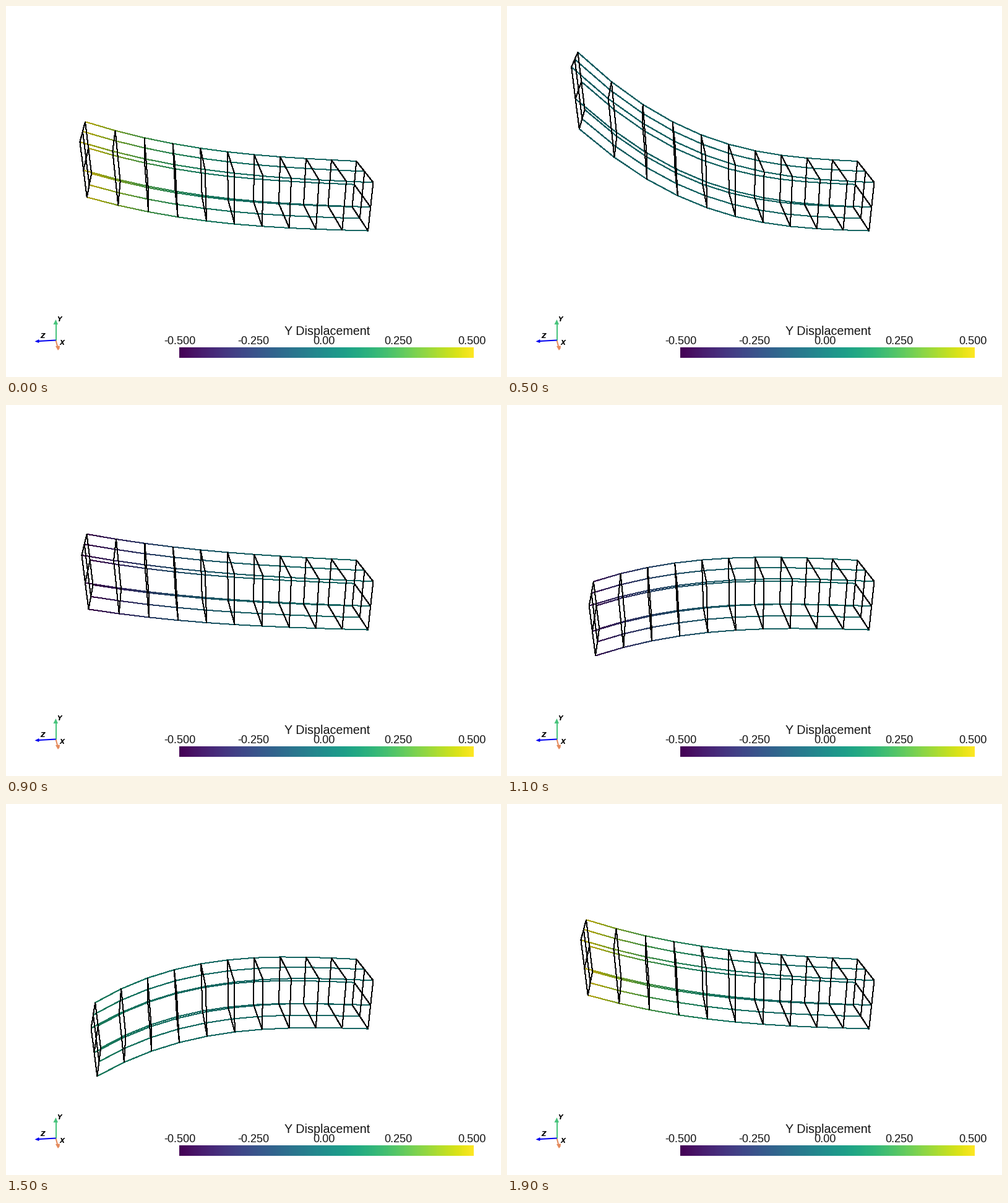
Recreate the animation shown at these times as a matplotlib script. Size 800 px wide and 600 px high, loop 2 s.

```python
import numpy as np
import matplotlib.pyplot as plt
from matplotlib.animation import FuncAnimation
from matplotlib.collections import LineCollection

W, H, DPI = 800, 600, 100
FRAMES, INTERVAL = 20, 100
PX = 72 / DPI                      # points per pixel

# The swing repeats its end pose; each step adds its displacement to the last.
swing = np.cos(np.linspace(0, 2 * np.pi, FRAMES))
travel = np.cumsum(swing)

stations = np.linspace(0, 5, 11)
ring_xy = np.array([(0, 1), (.5, 1), (1, 1), (1, .5),
                    (1, 0), (.5, 0), (0, 0), (0, .5)])
corners = ring_xy[::2]


def bend(z):
    return z ** 3 / 250


def fit_camera():
    """Solve the perspective matrix from a few beam corners on screen."""
    views = [
        (0, 0, corners, [(567, 241), (590, 275), (586, 354), (562, 318)]),
        (0, 5, corners, [(127, 184), (119, 218), (131, 306), (137, 266)]),
        (3, 5, corners, [(115, 82), (106, 108), (118, 204), (126, 173)]),
        (7, 5, corners, [(120, 124), (111, 153), (123, 246), (130.5, 211)]),
        (11, 5, corners, [(139, 283), (133, 321), (143, 403), (148, 360)]),
        (15, 5, corners, [(144, 319), (138, 359), (147, 438), (152.5, 393)]),
        (0, 2.5, corners[::2], [(356.5, 244), (368, 361)]),
        (3, 2.5, corners[::2], [(357, 233), (368, 350)]),
        (11, 2.5, corners[::2], [(357, 256), (368, 373)]),
        (15, 2.5, corners[::2], [(357.5, 261), (368, 377)]),
    ]
    rows, rhs = [], []
    for k, z, section, screen in views:
        for (x, y), (u, v) in zip(section, screen):
            p = np.array([x, y + travel[k] * bend(z), z, 1])
            rows.append(np.r_[p, np.zeros(4), -u * p[:3]])
            rows.append(np.r_[np.zeros(4), p, -v * p[:3]])
            rhs += [u, v]
    m = np.linalg.lstsq(np.array(rows), np.array(rhs), rcond=None)[0]
    return np.append(m, 1).reshape(3, 4)


camera = fit_camera()


def project(p):
    q = p @ camera[:, :3].T + camera[:, 3]
    return q[..., :2] / q[..., 2:] + 0.5


fig = plt.figure(figsize=(W / DPI, H / DPI), dpi=DPI, facecolor="white")
ax = fig.add_axes([0, 0, 1, 1])
ax.axis("off")

# Beam wireframe
rails = LineCollection([], linewidths=PX, antialiaseds=False, zorder=2)
rings = LineCollection([], linewidths=PX, antialiaseds=False, colors="black",
                       zorder=3)
ax.add_collection(rails, autolim=False)
ax.add_collection(rings, autolim=False)

SUB = 5                            # colour steps per cell
SHADE = 0.7                        # lighting on the coloured wires
steps = np.linspace(0, 5, 10 * SUB + 1)
step_bend = np.interp(steps, stations, bend(stations))
mid_bend = (step_bend[1:] + step_bend[:-1]) / 2


def ring_points(z, lift):
    return project(np.column_stack([ring_xy[:, 0], ring_xy[:, 1] + lift,
                                    np.full(8, z)]))


def update(k):
    segs = []
    for z in stations:
        pts = ring_points(z, travel[k] * bend(z))
        segs += [pts[[i, (i + 1) % 8]] for i in range(8)]
        if z in (0, 5):            # the end faces show their inner edges
            segs += [pts[[1, 5]], pts[[3, 7]]]
    rings.set_segments(segs)

    nodes = np.array([ring_points(z, travel[k] * b)
                      for z, b in zip(steps, step_bend)])
    rails.set_segments([nodes[i:i + 2, j] for j in range(8)
                        for i in range(len(steps) - 1)])
    shades = plt.cm.viridis(mid_bend * swing[k] + 0.5)
    shades[:, :3] *= SHADE
    rails.set_color(np.tile(shades, (8, 1)))
    return rails, rings


def label(x, y, s, size, **kw):
    style = {"color": "#141414", "family": "Liberation Sans", **kw}
    ax.text(x, y, s, fontsize=size * PX, ha="center", va="baseline", **style)


# Scalar bar
ax.imshow(np.linspace(0, 1, 256)[None], cmap="viridis", aspect="auto",
          extent=(280, 756, 569, 552), interpolation="nearest", zorder=1)
label(519, 532, "Y Displacement", 19.8)
for x, s in [(281, "-0.500"), (399.5, "-0.250"), (513.5, "0.00"),
             (633.5, "0.250"), (752.5, "0.500")]:
    label(x, 547, s, 18.2)

# Orientation axes
ORIGIN = (80.5, 540.5)
for end, head, color in [
        ((83, 550), [(80, 550), (87, 549.5), (86.5, 554), (84, 557)], "#e48a5c"),
        ((80.5, 514), [(76.5, 515), (84, 515), (80.5, 507)], "#46c37b"),
        ((53, 542), [(53.5, 539), (53.5, 545), (46.5, 542.5)], "#0000f0")]:
    ax.plot(*zip(ORIGIN, end), color=color, lw=2 * PX, solid_capstyle="butt")
    ax.fill(*zip(*head), color=color, lw=0)
for x, y, s in [(86.5, 510, "Y"), (59, 537, "Z"), (91, 548, "X")]:
    label(x, y, s, 10.5, family="DejaVu Sans", weight="bold", style="italic",
          color="black")

ax.set_xlim(0, W)
ax.set_ylim(H, 0)

anim = FuncAnimation(fig, update, frames=FRAMES, interval=INTERVAL,
                     init_func=lambda: update(0), repeat=True, repeat_delay=0,
                     blit=False)
plt.show()
```
